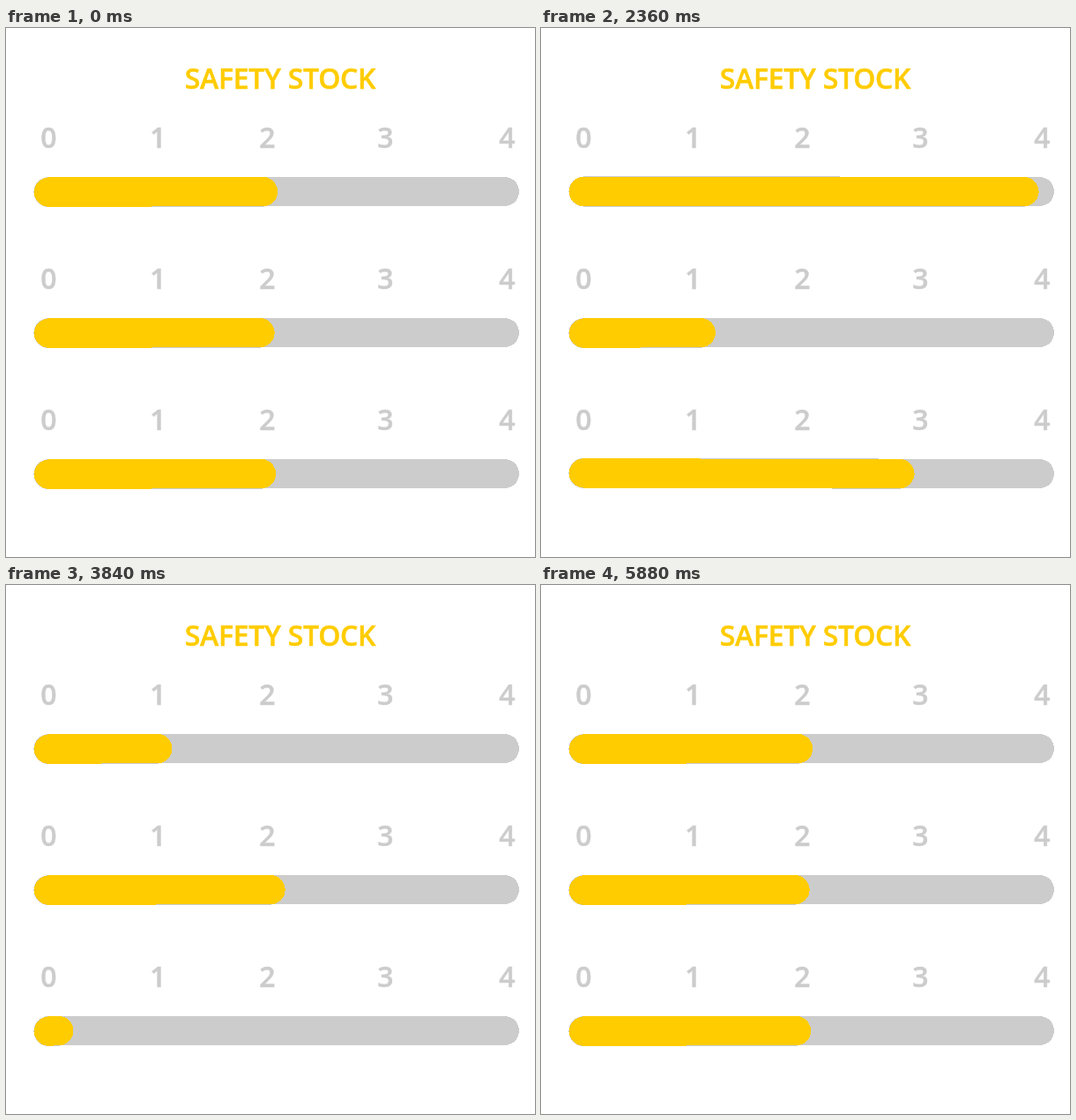
These frames come from a looping animation (600 px wide and 600 px high, 5920 ms). An HTML page:

```html
<!DOCTYPE html>
<html lang="en">
<head>
<meta charset="utf-8">
<title>Safety stock</title>
<style>
  html, body { margin: 0; width: 100%; height: 100%; overflow: hidden; background: #fff; }
  svg { display: block; width: 600px; height: 600px; }
  text {
    font: 600 32px "Open Sans", "Noto Sans", sans-serif;
    text-anchor: middle; fill: #ccc; stroke: #ccc; stroke-width: .5;
  }
  .title { fill: #fc0; stroke: #fc0; letter-spacing: -.3px; }
  line { stroke: #ccc; stroke-width: 33; stroke-linecap: round; shape-rendering: crispEdges; }
  .rim { stroke-width: 34.1; }
  .bar { stroke: #fc0; stroke-width: 33.34; }
</style>
</head>
<body>
<svg id="stage" viewBox="0 0 600 600">
  <text class="title" x="311" y="69">SAFETY STOCK</text>
</svg>
<script>
const STEP = 40, LOOP = 5920, CAP = 16.5, LEFT = 48.5;
const LABEL_X = [48.5, 172.5, 296.5, 430.5, 568.5];

// Each move runs steadily from one stop to the next, the last one back to the first
const moves = [[760, 1560], [2320, 3120], [3800, 4560], [5160, 5880]];

// Right edge at each stop; lift raises the left end at the second stop
const rows = [
  { stops: [308, 585, 174, 446.5], lift: 0.6 },
  { stops: [304.5, 191.5, 316.5, 316.5], lift: 0 },
  { stops: [306, 442, 70, 190], lift: 1.2 }
];

const stage = document.getElementById("stage");

function add(tag, attrs, content = "") {
  const el = document.createElementNS("http://www.w3.org/2000/svg", tag);
  for (const name in attrs) el.setAttribute(name, attrs[name]);
  el.textContent = content;
  return stage.appendChild(el);
}

const addLine = (name, y, x2) => add("line", { class: name, x1: LEFT, x2, y1: y, y2: y });

rows.forEach((row, i) => {
  row.y = 185.5 + 160 * i;
  LABEL_X.forEach((x, n) => add("text", { x, y: row.y - 49.5 }, n));
  addLine("track", row.y, 582 - CAP);
  row.lines = ["rim", "bar"].map(name => addLine(name, row.y + 0.1, LEFT));
});

const mix = (a, b, p) => a + (b - a) * p;

function draw() {
  const time = Math.floor(performance.now() % LOOP / STEP) * STEP;
  const done = moves.map(([from, to]) => Math.min(1, Math.max(0, (time - from) / (to - from))));
  const raised = done[0] - done[1];
  for (const { stops, lift, y, lines } of rows) {
    const right = done.reduce((x, p, i) => mix(x, stops[(i + 1) % stops.length], p), stops[0]);
    for (const line of lines) {
      line.setAttribute("x2", right - CAP);
      line.setAttribute("y1", y + 0.56 - lift * raised);
    }
  }
  requestAnimationFrame(draw);
}
draw();
</script>
</body>
</html>
```
